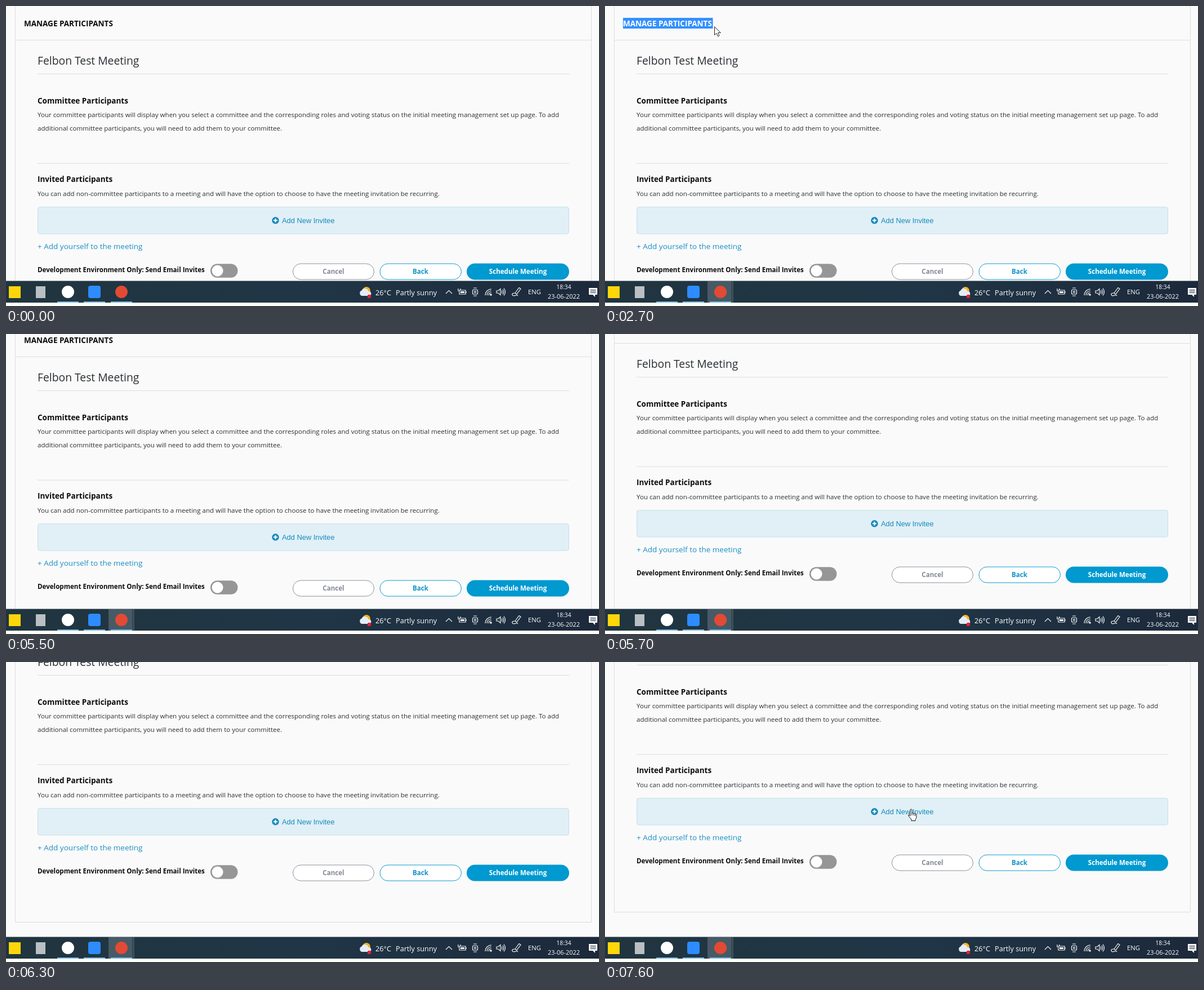
Animation of 1053x532 px, one loop 8000 ms. Source, as an HTML page:

```html
<!DOCTYPE html>
<html lang="en">
<head>
<meta charset="utf-8">
<title>Manage participants</title>
<style>
  html, body { margin: 0; width: 100%; height: 100%; overflow: hidden; background: #fff; }
  svg { display: block; width: 1053px; height: 532px; }
  text { font: 11.585px "Open Sans", sans-serif; fill: #2b2f33; white-space: pre; }
  .bold { font-weight: 700; fill: #0c0c0c; }
  .head { font-size: 13.52px; }
  .title { font-size: 19.31px; }
  .link { font-size: 13.52px; fill: #1b8fc4; }
  .invite { font: 12.87px "Liberation Sans", Arial, sans-serif; fill: #1489bd; }
  .mid { text-anchor: middle; }
  .rule { stroke: #dadde0; fill: none; }
  .bar text { fill: #fff; }
  .bar .weather { font-size: 12.7px; }
  .tray { fill: none; stroke: #f4f6f7; stroke-width: 1.2; }
</style>
</head>
<body>
<svg viewBox="0 0 1053 532">
  <defs>
    <linearGradient id="barFill">
      <stop offset="0" stop-color="#20353f"/>
      <stop offset=".5" stop-color="#203646"/>
      <stop offset="1" stop-color="#1c293b"/>
    </linearGradient>
    <clipPath id="selectionClip"><rect id="clipRect" x="32" y="21" height="19"/></clipPath>
  </defs>

  <rect width="1053" height="488" fill="#fafafa"/>
  <g id="page">
    <path class="rule" d="M16.5 -20V558.5H1039.5V-20M17 60.5H1039M56 120.5H1000M56 279H1000"/>
    <text class="bold head" x="32" y="35.8">MANAGE PARTICIPANTS</text>
    <g clip-path="url(#selectionClip)">
      <rect x="32" y="21" width="160" height="19" fill="#3390ff"/>
      <text class="bold head" x="32" y="35.8" style="fill:#fff">MANAGE PARTICIPANTS</text>
    </g>
    <text class="title" x="56" y="103.5">Felbon Test Meeting</text>

    <text class="bold head" x="56" y="173">Committee Participants</text>
    <text x="56" y="197">Your committee participants will display when you select a committee and the corresponding roles and voting status on the initial meeting management set up page. To add</text>
    <text x="56" y="220.5">additional committee participants, you will need to add them to your committee.</text>

    <text class="bold head" x="56" y="312">Invited Participants</text>
    <text x="56" y="336.5">You can add non-committee participants to a meeting and will have the option to choose to have the meeting invitation be recurring.</text>
    <rect x="56.5" y="356.5" width="943" height="47.5" rx="4" fill="#e1f0f6" stroke="#c3dfe9"/>
    <circle cx="478.5" cy="380.3" r="6.2" fill="#1489bd"/>
    <path d="M475 380.3H482M478.5 376.8V383.8" stroke="#fff" stroke-width="2"/>
    <text class="invite" x="490" y="385">Add New Invitee</text>
    <text class="link" x="56" y="430.5">+ Add yourself to the meeting</text>

    <text class="bold" x="56" y="472">Development Environment Only: Send Email Invites</text>
    <rect x="363" y="457.3" width="48.5" height="24.4" rx="12.2" fill="#969696"/>
    <circle cx="375.6" cy="469.5" r="10" fill="#fff"/>
    <g fill="#fff">
      <rect x="509.5" y="457" width="144" height="28" rx="14" stroke="#8c909e"/>
      <rect x="664" y="457" width="144.5" height="28" rx="14" stroke="#0f9bd0"/>
      <rect x="818" y="456.5" width="182" height="29" rx="14.5" fill="#0099d0"/>
    </g>
    <text class="bold mid" x="581.5" y="475" style="fill:#858997">Cancel</text>
    <text class="bold mid" x="736" y="475" style="fill:#0f93c8">Back</text>
    <text class="bold mid" x="909" y="475" style="fill:#fff">Schedule Meeting</text>
  </g>

  <g class="bar">
    <rect y="526" width="1053" height="6" fill="#fffffa"/>
    <rect y="487.5" width="1053" height="38.5" fill="url(#barFill)"/>
    <g id="activeTile">
      <rect x="182" y="488" width="42" height="38" fill="#475a65"/>
      <rect x="224.5" y="488" width="3.5" height="38" fill="#3c505b"/>
    </g>
    <path d="M91 525H129M138 525H176M186 525H224" stroke="#76b9ed" stroke-width="2"/>
    <rect x="5" y="497" width="21" height="21" fill="#ffd60a"/>
    <rect x="53" y="497" width="17" height="21" fill="#b9bfc2"/>
    <circle cx="110" cy="507" r="11" fill="#fff"/>
    <rect x="146" y="496" width="22" height="22" rx="4" fill="#2d8cff"/>
    <circle cx="205" cy="507" r="11" fill="#e34a35"/>

    <circle cx="640" cy="505" r="7" fill="#f9b321"/>
    <path d="M632 514a5 5 0 0 1-.5-9.500a6.500 6.500 0 0 1 12 1.500a4 4 0 0 1 1.500 8Z" fill="#e3edf8"/>
    <circle cx="645" cy="515" r="3.200" fill="#e81f35"/>
    <text class="weather" x="656" y="512.500">26°C</text>
    <text class="weather" x="692" y="512.500">Partly sunny</text>

    <g class="tray">
      <path d="M781 510L786.500 504.500L792 510"/>
      <path d="M805 504H816V511H805ZM817 506V509M803 501V506M807 501V504"/>
      <rect x="807" y="506" width="7" height="3" fill="#fff" stroke="none"/>
      <rect x="828.500" y="503" width="9" height="8" rx="2"/>
      <path d="M830 500H836M830 514H836"/>
      <circle cx="833" cy="507" r="1.500"/>
      <path d="M851 513A11 11 0 0 1 862 502M854 513A8 8 0 0 1 862 505M857 513A5 5 0 0 1 862 508"/>
      <circle cx="861" cy="512" r="1.200" fill="#fff"/>
      <path d="M871 505H874L878 501.500V512.500L874 509H871ZM880 504.500Q882 507 880 509.500M882 502.500Q885.500 507 882 511.500M884 500.500Q889 507 884 513.500"/>
      <path d="M904 509L911 499.500L914 501.500L907 511ZM904 509Q898 509 899 512T905 513Q908 512 909 514"/>
    </g>
    <text x="927" y="511" style="font-size:11.300px">ENG</text>
    <text class="mid" x="990.500" y="501.500" style="font-size:10.200px">18:34</text>
    <text class="mid" x="990.500" y="518.500" style="font-size:10.900px">23-06-2022</text>
    <path d="M1035 500H1050V512H1046V516L1042 512H1035Z" fill="#fff"/>
    <path d="M1037.500 503.500H1047.500M1037.500 506H1047.500M1037.500 508.500H1047.500" stroke="#203040"/>
  </g>

  <g id="arrow">
    <path d="M.5 .8V15.500L4 12.300L6.500 17.800L9 16.700L6.600 11.400H11.300Z" fill="#fff" stroke="#222"/>
  </g>
  <g id="beam">
    <path d="M0 .5H7M3.500 0V8M0 7.500H7" fill="none" stroke="#555"/>
  </g>
  <g id="hand">
    <path d="M4 13V2Q5.500-.5 7 2V8Q9 6.500 10 8.500Q12 7.300 12.700 9.300Q15 8.500 15 11V15Q15 18 13 19V21.500H6V19L1 13Q0 10.500 2 11Z" fill="#fff" stroke="#111"/>
    <path d="M7 8V12M10 9V12M12.700 10V13" stroke="#111"/>
  </g>
</svg>

<script>
const LOOP = 8000, STEP = 100;
const byId = id => document.getElementById(id);

// Time followed by one or more values; linear between entries.
const SCROLL = [
  [5300, 0], [5400, 8], [5500, 20], [5600, 33], [5700, 44], [5800, 51],
  [5900, 51], [6000, 65], [6100, 78], [6200, 89], [6300, 97],
  [6400, 97], [6500, 105], [6600, 112], [6700, 115]
];
const SELECTION = [
  [900, 0], [1000, 8], [1200, 90], [1300, 90], [1800, 156],
  [2000, 156], [2100, 159.5]
];
const MOVES = [
  { kind: "arrow", from: 200, to: 700, path: [[200, 635, 488], [400, 330, 205], [500, 160, 62], [600, 55, 4]] },
  { kind: "beam", from: 700, to: 1000, path: [[700, 28, 26]] },
  { kind: "beam", from: 1000, to: 2100, path: [[1000, 33, 27], [1200, 115, 27], [1300, 115, 27], [1800, 181, 27]] },
  { kind: "arrow", from: 2100, to: 3800, path: [
    [2100, 189, 30], [2300, 196, 33], [2400, 196, 33], [2600, 194, 36], [2900, 194, 36],
    [3100, 130, 53], [3400, 2, 96], [3600, 48, 132], [3800, 119, 155]] },
  { kind: "beam", from: 3800, to: 4100, path: [[3800, 119, 165]] },
  { kind: "arrow", from: 4100, to: 4600, path: [[4100, 210, 172], [4300, 600, 203], [4400, 686, 210]] },
  { kind: "arrow", from: 7100, to: 7200, path: [[7100, 856, 227]] },
  { kind: "hand", from: 7200, to: LOOP, path: [[7200, 755, 247], [7400, 580, 259], [7500, 537, 260], [7600, 538, 260]] }
];

function sample(keys, t) {
  const next = keys.findIndex(key => key[0] > t);
  if (next === 0) return keys[0].slice(1);
  if (next < 0) return keys[keys.length - 1].slice(1);
  const a = keys[next - 1], b = keys[next];
  const part = (t - a[0]) / (b[0] - a[0]);
  return a.slice(1).map((value, i) => value + (b[i + 1] - value) * part);
}

function draw(t) {
  const [scroll] = sample(SCROLL, t);
  byId("page").setAttribute("transform", `translate(0 ${-Math.round(scroll)})`);

  const width = t < 2800 ? sample(SELECTION, t)[0] : 0;
  byId("clipRect").setAttribute("width", width);
  byId("activeTile").style.display = t < 1000 ? "none" : "";

  const move = MOVES.find(m => t >= m.from && t < m.to);
  for (const kind of ["arrow", "beam", "hand"]) {
    const cursor = byId(kind), shown = move && move.kind === kind;
    cursor.style.display = shown ? "" : "none";
    if (shown) {
      const [x, y] = sample(move.path, t).map(Math.round);
      cursor.setAttribute("transform", `translate(${x} ${y})`);
    }
  }
}

const start = performance.now();
function tick() {
  const t = (performance.now() - start) % LOOP;
  draw(Math.floor(t / STEP) * STEP);
  requestAnimationFrame(tick);
}
tick();
</script>
</body>
</html>
```
